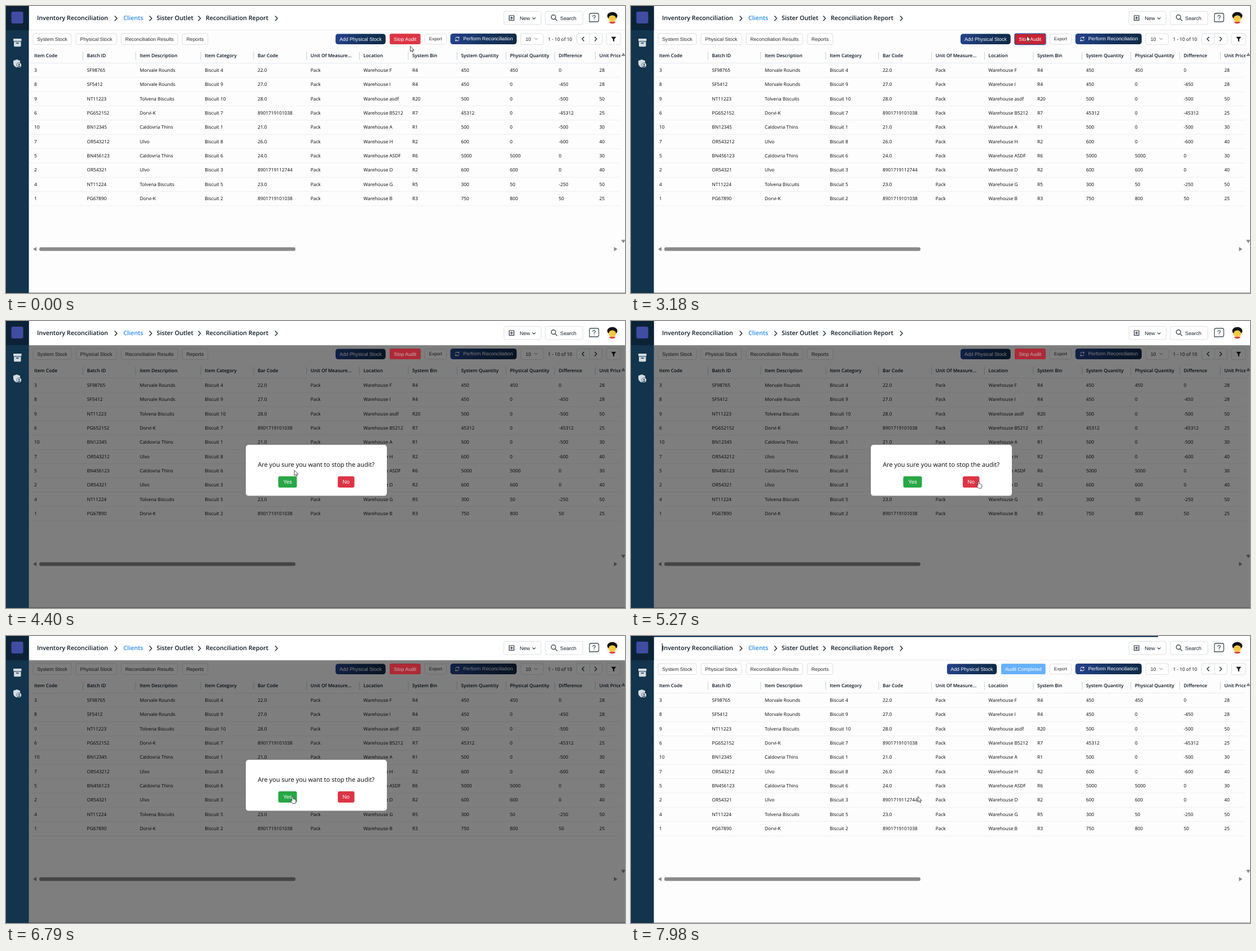
An HTML page that plays this animation: 1097x510 px, repeating every 8000 ms.

```html
<!DOCTYPE html>
<html lang="en">
<head>
<meta charset="utf-8">
<title>Inventory Reconciliation</title>
<style>
html, body { margin: 0; width: 100%; height: 100%; overflow: hidden; background: #fdfdfd; }
svg { display: block; width: 100%; height: 100%; text-rendering: geometricPrecision; }
text { font: 8.3px "Open Sans", "Noto Sans", sans-serif; fill: #050505; }
.head { font-weight: 600; fill: #03101c; }
.crumb { font-size: 10.75px; font-weight: 600; fill: #0a1825; }
.link { fill: #2a8af0; }
.ask { font-size: 11px; }
.btn, .top, .small, .answer { font-family: "Liberation Sans", Arial, sans-serif; font-size: 8.75px; text-anchor: middle; fill: #2a2a2a; }
.top { font-size: 9.1px; fill: #16212c; }
.small { font-size: 8px; }
.answer { font-size: 9.6px; }
.white { fill: #fff; }
.line { fill: none; stroke: #26323d; stroke-width: 1.2; stroke-linecap: round; stroke-linejoin: round; }
.box { fill: #fff; stroke: #d3d7dc; stroke-width: .8; }

/* Every timeline is 8 s, so 1% is 80 ms. */
.anim { animation: 8s infinite step-end; }
#cursor { animation-name: move; animation-timing-function: ease-in-out; }
#hand { animation-name: hand; }
#arrow { animation-name: arrow; }
#stop { animation-name: hover; animation-timing-function: linear; }
#ring { animation-name: ring; }
#modal { animation-name: modal; }
#caret { animation-name: caret; }
#add { animation-name: shift; }
#done { animation-name: done; }
#running { animation-name: running; }
#bar { transform-origin: 40px 0; animation-name: load; animation-timing-function: ease-out; }

@keyframes move {
  0%, 5.625% { transform: translate(716px, 71px); }
  6.875%, 19.25% { transform: translate(709px, 70px); }
  25.125%, 46.875% { transform: translate(701px, 53px); }
  56.875% { transform: translate(496px, 281px); }
  57.625% { transform: translate(496px, 281px); animation-timing-function: ease-in; }
  62.5% { transform: translate(560px, 288px); animation-timing-function: ease-out; }
  65.875% { transform: translate(616px, 284.5px); }
  67% { transform: translate(619px, 285px); }
  67.75% { transform: translate(619px, 285px); animation-timing-function: ease-in; }
  71.25% { transform: translate(570px, 277px); animation-timing-function: ease-out; }
  75% { transform: translate(518px, 280px); }
  77.5%, 78.625% { transform: translate(534px, 285px); }
  84.875%, 100% { transform: translate(508px, 285px); }
}
@keyframes hand {
  0% { visibility: hidden; } 55.25% { visibility: visible; }
  59.75% { visibility: hidden; } 63.75% { visibility: visible; }
  70% { visibility: hidden; } 82.25% { visibility: visible; }
  91.875%, 100% { visibility: hidden; }
}
@keyframes arrow {
  0% { visibility: visible; } 55.25% { visibility: hidden; }
  59.75% { visibility: visible; } 63.75% { visibility: hidden; }
  70% { visibility: visible; } 82.25% { visibility: hidden; }
  91.875%, 100% { visibility: visible; }
}
@keyframes hover {
  0%, 20.6% { fill: #dc3545; }
  22.5%, 40.12% { fill: #c82333; }
  40.125%, 100% { fill: #dc3545; }
}
@keyframes ring {
  0% { visibility: hidden; } 37.75% { visibility: visible; } 40.125%, 100% { visibility: hidden; }
}
@keyframes modal {
  0% { visibility: hidden; } 40.125% { visibility: visible; } 91.875%, 100% { visibility: hidden; }
}
@keyframes caret { 0% { visibility: hidden; } 91.875%, 100% { visibility: visible; } }
@keyframes done { 0% { visibility: hidden; } 93.375%, 100% { visibility: visible; } }
@keyframes running { 0% { visibility: visible; } 93.375%, 100% { visibility: hidden; } }
@keyframes shift { 0% { transform: none; } 93.375%, 100% { transform: translateX(-24.5px); } }
@keyframes load { 0%, 93.375% { transform: scaleX(0); } 99.75%, 100% { transform: scaleX(1); } }
</style>
</head>
<body>
<script>
const rect = (x, y, w, h, fill, r = 0, more = '') =>
  `<rect x="${x}" y="${y}" width="${w}" height="${h}" rx="${r}" fill="${fill}" ${more}/>`;
const text = (x, y, words, kind = '') => `<text x="${x}" y="${y}" class="${kind}">${words}</text>`;
const path = (d, more = 'class="line"') => `<path d="${d}" ${more}/>`;
const group = (id, body) => `<g id="${id}" class="anim">${body}</g>`;
const frame = (x, y, w, h, r = 3) => rect(x, y, w, h, '#fff', r, 'class="box"');
const button = (x, y, w, h, words, fill, r = 3, kind = 'btn white') =>
  rect(x, y, w, h, fill, r) + text(x + w / 2, y + h / 2 + 3.1, words, kind);
const outlined = (x, w, words) => frame(x, 49, w, 19.5) + text(x + w / 2, 61.9, words, 'btn');

const columns = [
  [50, 'Item Code'], [143.5, 'Batch ID'], [237, 'Item Description'], [352.3, 'Item Category'],
  [446, 'Bar Code'], [539.8, 'Unit Of Measure...'], [633.5, 'Location'], [720, 'System Bin'],
  [806.5, 'System Quantity'], [893, 'Physical Quantity'], [979.5, 'Difference'], [1051.5, 'Unit Price']
];
// item | batch | description | category | bar code | warehouse | bin | system | physical | price
const stock = `3|SF98765|Morvale Rounds|4|22.0|F|R4|450|450|28
8|SF5412|Morvale Rounds|9|27.0|I|R4|450|0|28
9|NT11223|Tolvena Biscuits|10|28.0|asdf|R20|500|0|50
6|PG652152|Dorvi-K|7|8901719101038|B5212|R7|45312|0|25
10|BN12345|Caldovria Thins|1|21.0|A|R1|500|0|30
7|OR543212|Ulvo|8|26.0|H|R2|600|0|40
5|BN456123|Caldovria Thins|6|24.0|ASDF|R6|5000|5000|30
2|OR54321|Ulvo|3|8901719112744|D|R2|600|600|40
4|NT11224|Tolvena Biscuits|5|23.0|G|R5|300|50|50
1|PG67890|Dorvi-K|2|8901719101038|B|R3|750|800|25`.split('\n');

function table() {
  let out = rect(42, 101, 1047, .8, '#e2e5e8');
  columns.forEach(([x, name], i) => {
    out += text(x, 91.1, name, 'head');
    if (i) out += rect(x - 7.6, 81.5, .9, 14, '#c3c8ce');
  });
  stock.forEach((line, row) => {
    const [item, batch, name, kind, bar, house, bin, system, physical, price] = line.split('|');
    const cells = [item, batch, name, 'Biscuit ' + kind, bar, 'Pack', 'Warehouse ' + house,
      bin, system, physical, physical - system, price];
    const y = 117 + row * 25.35;
    cells.forEach((cell, i) => out += text(columns[i][0], y, cell));
    out += rect(42, y + 9.4, 1047, .8, '#e9ebed');
  });
  return `<g clip-path="url(#grid)">${out}</g>`;
}

function scrollbars() {
  const grey = 'fill="#8a8a8a"';
  return rect(59, 428.7, 454, 6.5, '#8b8b8b', 3) +
    path('M48 432l6-3.8v7.6z', grey) + path('M1083.5 432l-6-3.8v7.6z', grey) +
    path('M1094 83l3.8 6h-7.6z', grey) + path('M1094 421.5l3.8-6h-7.6z', grey);
}

function sidebar() {
  const pale = 'fill="#d3dce3"', navy = '#12344d';
  return rect(0, 0, 40.5, 510, navy) + rect(0, 0, 40.5, 43, '#0c2337') +
    rect(9.5, 10, 21, 21, '#3f4da3', 3) +
    rect(13, 58, 14.5, 4.6, '#d3dce3', 1) + path('M14 63.6h12.5v7.2q0 1.4-1.4 1.4h-9.7q-1.4 0-1.4-1.4z', pale) +
    rect(17.6, 65.2, 5.2, 1.6, navy, .8) +
    path('M19 95l6 2.3v4.6q0 5-6 7.4q-6-2.4-6-7.4v-4.6z', pale) +
    `<circle cx="23.2" cy="105" r="4.6" fill="${navy}"/><circle cx="23.2" cy="105" r="3.9" ${pale}/>` +
    `<circle cx="23.2" cy="103.8" r="1.2" fill="${navy}"/>` + path('M20.9 107q2.3-2 4.6 0q-2.3 1.8-4.6 0z', `fill="${navy}"`);
}

function header() {
  const chevrons = [193, 254.5, 341, 477.3].map(x => path(`M${x} 18l3.8 4-3.8 4`, 'class="line" style="stroke-width:1.5"'));
  const help = 'class="line" style="stroke:#46525d;stroke-width:1.3"';
  return rect(40, 0, 1057, 43, '#fff') + rect(40, 42.4, 1057, .8, '#e4e6e8') +
    text(55, 25, 'Inventory Reconciliation', 'crumb') + text(208, 25, 'Clients', 'crumb link') +
    text(267, 25, 'Sister Outlet', 'crumb') + text(354, 25, 'Reconciliation Report', 'crumb') + chevrons.join('') +
    frame(882.4, 9.4, 66, 23.6) + path('M891.8 17h8.4v8.4h-8.4zM896 19v4.4M893.8 21.2h4.4') +
    text(919.5, 24.5, 'New', 'top') + path('M933.3 20.8l2.4 2.4 2.4-2.4') +
    frame(955.8, 9.4, 66.5, 23.6) + `<circle cx="970.2" cy="19.8" r="3.9" class="line"/>` + path('M973.2 22.8l3.4 3.4') +
    text(996.5, 24.5, 'Search', 'top') +
    path('M1037 13h10.5q3 0 3 3v9q0 3-3 3h-13.5v-12q0-3 3-3z', help) +
    path('M1040 18.6q.2-2 2.2-2t2.2 1.9q0 1.3-1.3 2t-.9 1.8M1042.2 24.6v.1', help) +
    `<circle cx="1074.5" cy="21" r="11" fill="#f4f4f1"/>` +
    path('M1068.5 29q6-3 12 0q-6 4.5-12 0z', 'fill="#d8343a"') +
    `<ellipse cx="1074.5" cy="17.6" rx="9" ry="6.8" fill="#111"/><ellipse cx="1074.5" cy="22.4" rx="6.6" ry="6" fill="#f6c944"/>`;
}

function toolbar() {
  return outlined(48, 68, 'System Stock') + outlined(124, 72, 'Physical Stock') +
    outlined(204.2, 100, 'Reconciliation Results') + outlined(312.3, 45.5, 'Reports') +
    group('add', button(584, 49.5, 88.7, 18.6, 'Add Physical Stock', 'url(#navy)', 4.5)) +
    group('running', `<g id="stop" class="anim" fill="#dc3545"><rect x="680" y="49.3" width="54.6" height="18.8" rx="3"/></g>` +
      text(707.3, 61.8, 'Stop Audit', 'btn white')) +
    group('ring', rect(680, 49.1, 54.9, 19.5, 'none', 3, 'stroke="#264a9c" stroke-width="1.4"')) +
    group('done', button(656, 49.3, 78.6, 18.8, 'Audit Completed', '#66b0fd', 2.5)) +
    frame(742.2, 49.8, 38.3, 18) + text(761.4, 61.3, 'Export', 'small') +
    rect(787.5, 49, 117.5, 19, 'url(#navy)', 4.5) + text(854.3, 61.4, 'Perform Reconciliation', 'btn white') +
    path('M796.4 57.6a3.5 3.5 0 0 1 6.3-.7v-1.8M802.7 56.9h-1.8M803 59.6a3.5 3.5 0 0 1-6.3.7v1.8M796.7 60.3h1.8', 'class="line" style="stroke:#fff;stroke-width:1"') +
    frame(912.3, 49, 40, 19.5) + text(925.5, 61.9, '10', 'btn') + path('M936.8 57.2l2.6 2.6 2.6-2.6', 'class="line" style="stroke:#777;stroke-width:1"') +
    text(960.5, 62.3, '1 - 10 of 10') +
    frame(1011.5, 49, 45, 19) + rect(1034, 49, .8, 19, '#d3d7dc') +
    path('M1024.2 55.2l-3.2 3.4 3.2 3.4M1043.6 55.2l3.2 3.4-3.2 3.4', 'class="line" style="stroke-width:1.4"') +
    frame(1064.3, 48.4, 24.8, 20.4) + path('M1072.4 54.8h9l-3.4 4.2v4.4l-2.2-1.4v-3z', 'fill="#151515"');
}

const modal = group('modal',
  rect(40, 43, 1057, 467, '#000', 0, 'fill-opacity=".5"') +
  rect(680, 49.3, 54.6, 18.8, '#ae2936', 3) + `<text x="707.3" y="61.8" class="btn" style="fill:#c0b4b5">Stop Audit</text>` +
  rect(425, 220, 250, 90.6, '#fff', 5) + text(446.3, 258.7, 'Are you sure you want to stop the audit?', 'ask') +
  button(482.5, 276, 33, 20, 'Yes', '#28a745', 3, 'answer white') +
  button(588, 276, 29.5, 20, 'No', '#dc3545', 3, 'answer white'));

const outline = 'fill="#fff" stroke="#222" stroke-width=".8" stroke-linejoin="round"';
const cursor = group('cursor',
  group('arrow', path('M.5 .3v9.6l2.2-2 1.5 3.3 1.5-.7-1.5-3.2h3z', outline)) +
  group('hand', path('M-1.2 1.2q1.1-1.6 2.2 0v3.5q1.2-.7 1.8.4q1.2-.5 1.7.5q1.3-.2 1.3 1.2v2.6q0 1.6-1.2 3.4h-4.6q-1.3-2.2-3.4-4.6q-.3-1.7 1.2-1.1l1 1z', outline)));

document.body.innerHTML = `<svg viewBox="0 0 1097 510">
  <defs>
    <linearGradient id="navy">
      <stop stop-color="#24438c"/><stop offset=".5" stop-color="#15335f"/><stop offset="1" stop-color="#0e2a47"/>
    </linearGradient>
    <clipPath id="grid"><rect x="40" y="74" width="1049" height="300"/></clipPath>
  </defs>` +
  rect(0, 0, 1097, 510, '#fdfdfd') + toolbar() + table() + scrollbars() + rect(40, 509, 1057, 1, '#a3a3a3') +
  modal + header() + sidebar() +
  group('caret', rect(54.8, 13, 1, 14.5, '#111')) +
  group('bar', rect(40, 0, 894, 1.9, '#14375c')) +
  cursor + '</svg>';
</script>
</body>
</html>
```
